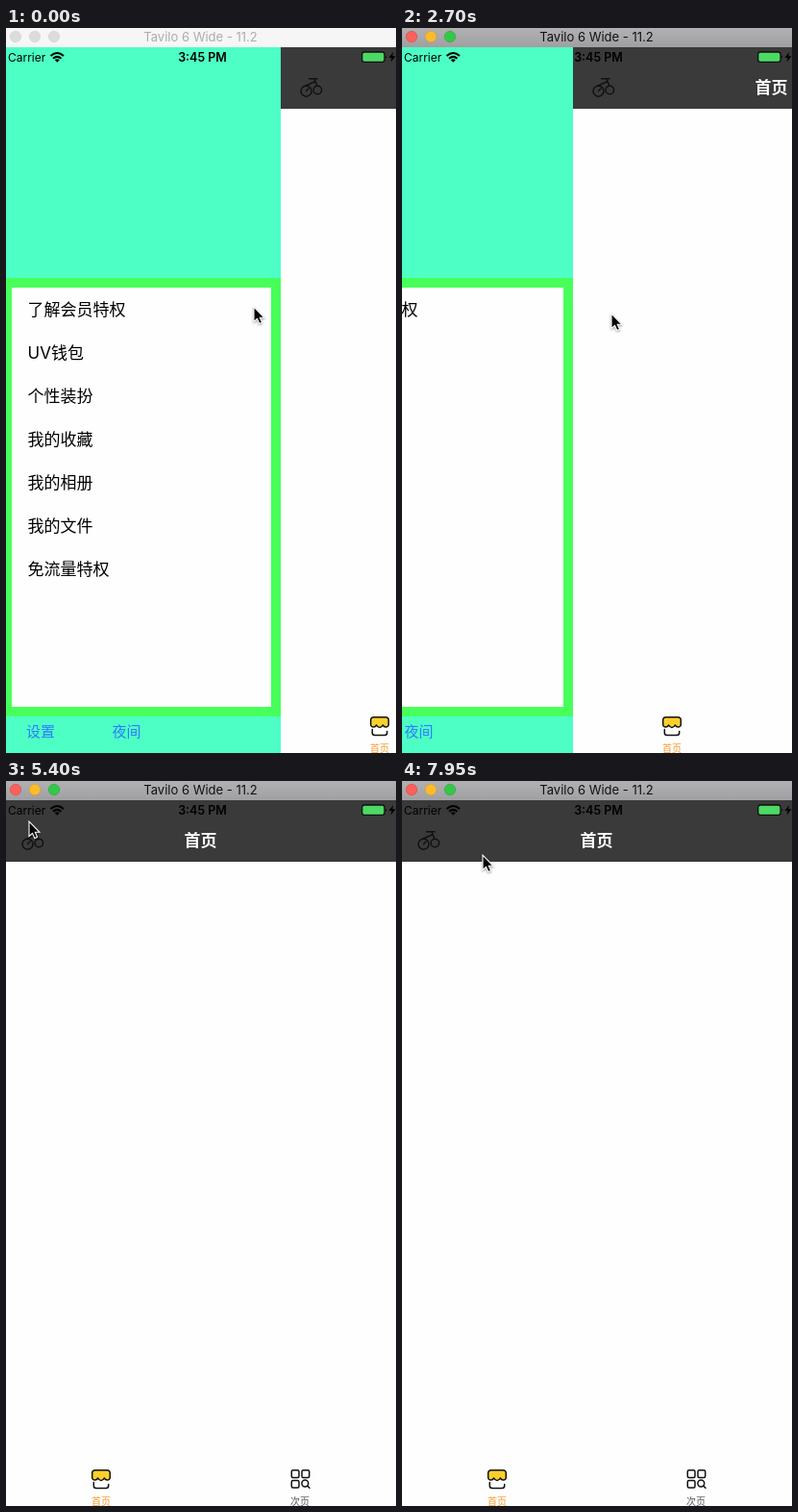
These frames come from a looping animation (406 px wide and 754 px high, 8000 ms). An HTML page:

```html
<!DOCTYPE html>
<html lang="zh-CN">
<head>
<meta charset="utf-8">
<style>
  html, body { margin: 0; width: 100%; height: 100%; overflow: hidden; background: #fefefe; }
  svg { display: block; width: 100%; height: 100%; }
  text { font-family: Inter, "Noto Sans CJK SC", "Noto Sans CJK", sans-serif; }
  .mid { text-anchor: middle; }
  .line { fill: none; stroke: #111; stroke-width: 1.5; stroke-linecap: round; stroke-linejoin: round; }
  #menu text { font-size: 17px; }
  #menu .link { font-size: 15px; fill: #2c7cff; }
  .tab { font-size: 10px; text-anchor: middle; }
  #bar rect { fill: #f6f6f6; }
  #bar circle { fill: #dcdcdc; stroke: #cfcfcf; stroke-width: .6; }
  #bar text { font-size: 13px; fill: #acacac; }
  #bar.active rect { fill: url(#chrome); }
  #bar.active text { fill: #111; }
  #bar.active .close { fill: #fc605b; stroke: #de4643; }
  #bar.active .min { fill: #fdbc2e; stroke: #dd9d26; }
  #bar.active .max { fill: #34c84a; stroke: #27a837; }
</style>
</head>
<body>
<svg viewBox="0 0 406 754" preserveAspectRatio="none">
  <defs>
    <linearGradient id="chrome" x2="0" y2="1">
      <stop stop-color="#b1b0b2"/><stop offset="1" stop-color="#a09fa1"/>
    </linearGradient>
  </defs>
  <rect width="406" height="754" fill="#fefefe"/>

  <g id="page">
    <rect x="-4" y="20" width="414" height="64" fill="#3a3a3a"/>
    <text class="mid" x="202.5" y="68" font-size="17" font-weight="600" fill="#fff">首页</text>
    <g class="line">
      <circle cx="22.5" cy="65.7" r="5.5"/>
      <circle cx="34.3" cy="64.5" r="4.3"/>
      <path d="M25.5 52.8H34M31 53L33.8 60M31 56L21.5 60.2M22.5 65.5L25 63"/>
    </g>
    <g class="line">
      <path fill="#fad02c" d="M93 716.8H105Q108.3 716.8 108.3 720V724.5Q108 727 105.5 727Q103.5 727 102.3 725Q101 727.5 99 727.5Q97 727.5 95.7 725Q94.5 727 92.5 727Q90 727 89.7 724.5V720Q89.7 716.8 93 716.8Z"/>
      <path d="M91.3 729.5V733Q91.3 735.5 94 735.5H104Q106.7 735.5 106.7 733V731.5"/>
    </g>
    <text class="tab" x="99" y="753" fill="#f39a2b">首页</text>
    <g class="line">
      <rect x="297.3" y="716.7" width="7.7" height="7.7" rx="1.5"/>
      <rect x="308" y="716.7" width="7.7" height="7.7" rx="1.5"/>
      <rect x="297.3" y="727.4" width="7.7" height="7.7" rx="1.5"/>
      <circle cx="311.3" cy="730.5" r="3.4"/>
      <path d="M313.8 733L316 735.3"/>
    </g>
    <text class="tab" x="306" y="753" fill="#555">次页</text>
  </g>

  <g id="menu">
    <rect x="-4" y="20" width="290" height="734" fill="#4dffc4"/>
    <rect x="-4" y="260" width="290" height="456" fill="#47ff5a"/>
    <rect x="6" y="270" width="270" height="436" fill="#fefefe"/>
    <text class="link" x="21" y="737">设置</text>
    <text class="link" x="110.500" y="737">夜间</text>
  </g>

  <g id="status">
    <text x="2" y="35" font-size="12">Carrier</text>
    <text class="mid" x="204.500" y="35" font-size="12.500" font-weight="600">3:45 PM</text>
    <g fill="none" stroke="#000" stroke-width="2">
      <path d="M46.500 29Q53.300 23 60 29M49 31.700Q53.300 28 57.500 31.700"/>
    </g>
    <path d="M50.800 33.200Q53.300 31.200 55.700 33.200L53.300 35.700Z"/>
    <rect x="370.700" y="25" width="23.300" height="10.300" rx="2.300" fill="#4cd964" stroke="#111" stroke-width="1.300"/>
    <path d="M395.300 28.300Q397 30.200 395.300 32ZM403 25L398.500 31H401.500L400.500 35.500L405.500 29.300H402.300Z"/>
  </g>

  <g id="bar">
    <rect width="406" height="20"/>
    <circle class="close" cx="10" cy="9" r="5.700"/>
    <circle class="min" cx="30" cy="9" r="5.700"/>
    <circle class="max" cx="50" cy="9" r="5.700"/>
    <text class="mid" x="202.500" y="14">Tavilo 6 Wide - 11.2</text>
  </g>

  <path id="cursor" d="M0 0V15.500L3.500 12.300L5.800 17.500L8.600 16.200L6.300 11.300H11Z"
    stroke="#fff" stroke-width="1.100" style="filter:drop-shadow(0 1px 1px #0006)"/>
</svg>
<script>
const $ = id => document.getElementById(id);
const LOOP = 8000, STEP = 150, DRAWER = 290;

const items = ['了解会员特权', 'UV钱包', '个性装扮', '我的收藏', '我的相册', '我的文件', '免流量特权'];
items.forEach((label, i) => {
  const text = document.createElementNS('http://www.w3.org/2000/svg', 'text');
  text.setAttribute('x', 22.5);
  text.setAttribute('y', 299 + 45 * i);
  text.textContent = label;
  $('menu').append(text);
});

// time, cursor x, cursor y, drawer offset
const keys = [
  [0, 258, 290, 290], [750, 320, 263, 290], [1350, 318, 263, 290],
  [1500, 290, 268, 268], [1800, 85, 288, 62], [1950, 24, 292, 0],
  [2250, 36, 296, 0], [2400, 58, 297, 22], [2550, 119, 297, 83],
  [2700, 218, 297, 182], [2850, 285, 293, 265], [3000, 304, 286, 290],
  [3150, 304, 286, 290], [3450, 300, 282, 285], [3600, 291, 281, 276],
  [4200, 115, 285, 100], [4500, 15, 288, 0], [4800, 18, 270, 0],
  [4950, 18, 270, 0], [5250, 22, 90, 0], [5400, 24, 42, 0],
  [5850, 26, 57, 0], [6000, 26, 58, 39], [6150, 26, 58, 165],
  [6300, 28, 60, 265], [6450, 110, 92, 290], [6600, 220, 132, 290],
  [6750, 220, 132, 290], [7050, 278, 151, 290], [7350, 325, 160, 282],
  [7500, 300, 150, 160], [7650, 220, 122, 30], [7800, 146, 97, 0], [7950, 84, 77, 0]
];

function pose(t) {
  const next = keys.findIndex(key => key[0] > t);
  if (next < 0) return keys.at(-1);
  const a = keys[next - 1], b = keys[next];
  const k = (t - a[0]) / (b[0] - a[0]);
  return a.map((v, i) => v + (b[i] - v) * k);
}

const move = (id, x, y) => $(id).setAttribute('transform', `translate(${Math.round(x)} ${Math.round(y)})`);

function draw(now) {
  const t = Math.floor(now % LOOP / STEP) * STEP;
  const [, x, y, offset] = pose(t);
  move('page', offset, 0);
  move('menu', offset - DRAWER, 0);
  move('cursor', x, y);
  $('bar').classList.toggle('active', t >= 1350);
  requestAnimationFrame(draw);
}
draw(0);
</script>
</body>
</html>
```
